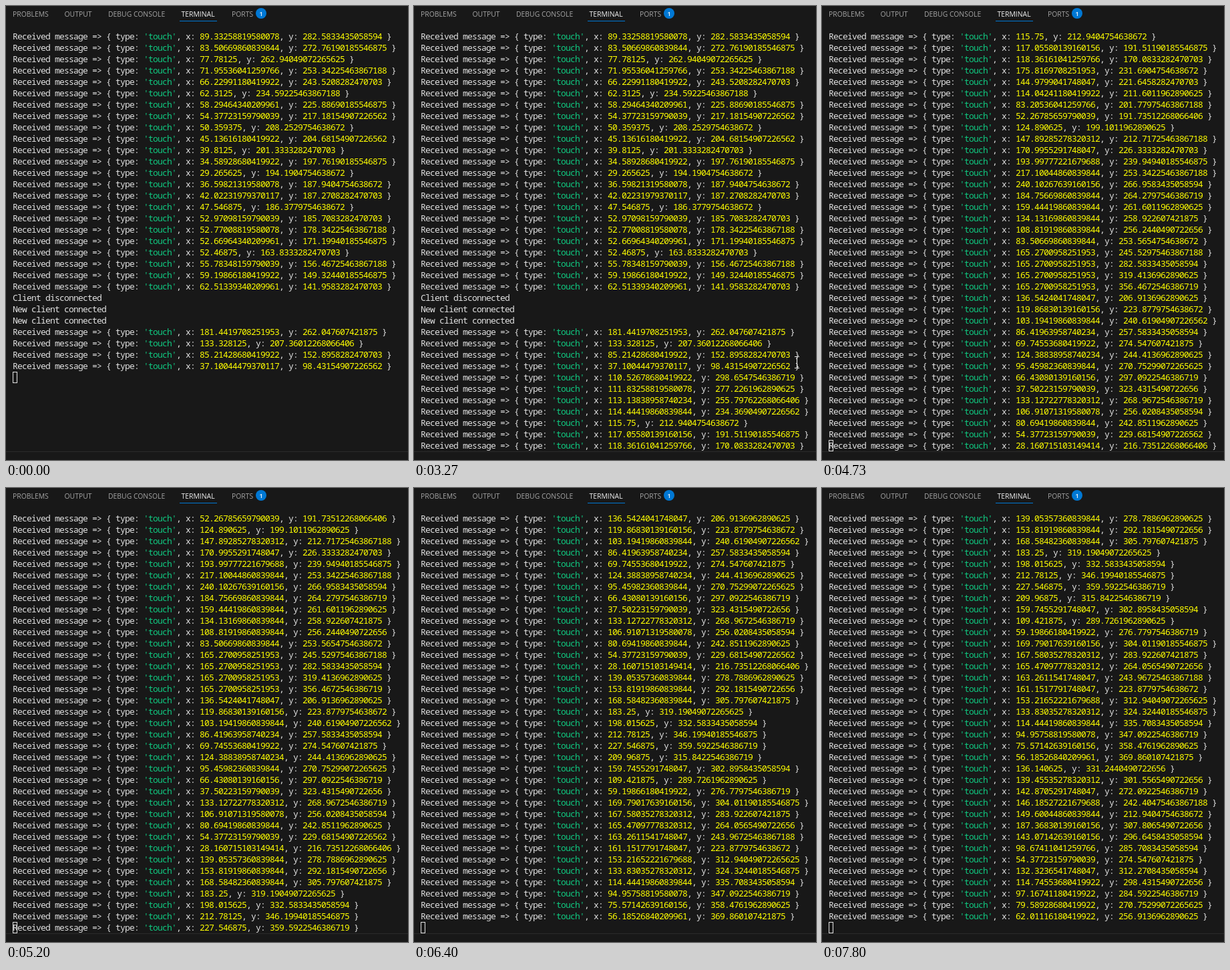
An HTML page with a canvas that plays this animation: 602x679 px, repeating every 8000 ms.

```html
<!DOCTYPE html>
<html lang="en">
<head>
<meta charset="utf-8">
<title>Terminal log</title>
<style>
html, body { margin: 0; width: 100%; height: 100%; overflow: hidden; background: #181818; }
canvas { display: block; }
</style>
</head>
<body>
<canvas id="stage" width="602" height="679"></canvas>
<script>
const ctx = document.getElementById('stage').getContext('2d', { alpha: false });
const LOOP = 8000, ROWS = 37, CELL_W = 7, CELL_H = 17, LEFT = 10, TOP = 37;
const BG = '#181818', FG = '#e2e2e2', GREEN = '#10c880', YELLOW = '#ffff00', BLUE = '#0078d4';

const log = [], steps = [];

const say = text => log.push([[text, FG]]);

// The touch screen reports positions on a fixed grid, as 32-bit floats.
const snap = (v, size, offset) =>
  String(Math.fround((Math.round((v * 448 - offset) / size) * size + offset) / 448));

function touch(x, y) {
  log.push([
    ['Received message => { type: ', FG], ["'touch'", GREEN],
    [', x: ', FG], [snap(x, 45, 16), YELLOW],
    [', y: ', FG], [snap(y, 100, 292 / 3), YELLOW], [' }', FG]
  ]);
}

// One finger stroke: n touches spread evenly along a polyline.
function swipe(n, ...points) {
  for (let i = 0; i < n; i++) {
    const u = i / (n - 1) * (points.length - 1);
    const k = Math.min(Math.floor(u), points.length - 2);
    const [a, b] = [points[k], points[k + 1]];
    const mix = axis => a[axis] + (b[axis] - a[axis]) * (u - k);
    touch(mix(0), mix(1));
  }
}

const step = (t, top, cursor, pointer = false) =>
  steps.push({ t, top, cursor, pointer, end: log.length });

// A live swipe first fills the cursor row, then scrolls once more.
function live(start, settle, n, from, to) {
  swipe(n, from, to);
  if (start < settle) step(start, log.length - ROWS, ROWS - 1);
  step(settle, log.length - ROWS + 1, ROWS - 1);
}

swipe(13, [89.33, 282.6], [66.23, 243.5], [50.36, 208.3], [29.27, 194.2]);
swipe(10, [36.6, 187.9], [52.97, 185.7], [52.47, 163.8], [62.51, 142]);
say('Client disconnected');
say('New client connected');
say('New client connected');
swipe(4, [181.44, 262], [37.1, 98.4]);
step(0, 0, 30);

swipe(7, [110.53, 298.7], [118.36, 170.1]);
step(1530, 0, 30);
step(1600, 0, -1);

swipe(5, [175.82, 231.7], [52.27, 191.7]);
swipe(6, [124.89, 199.1], [240.1, 267]);
swipe(5, [184.76, 264.3], [83.51, 253.6]);
swipe(4, [165.27, 245.5], [165.27, 356.5]);
swipe(5, [136.54, 206.9], [69.75, 274.5]);

// The wheel brings the view down to the newest line.
for (let i = 0; i < 7; i++) step(3270 + i * 66.7, i * 3, -1, true);
step(4070, 22, -1);
step(4130, 26, ROWS - 1);

live(4200, 4270, 4, [124.39, 244.4], [37.5, 323.4]);
live(4730, 4800, 5, [133.13, 269], [28.16, 216.7]);
live(5200, 5270, 7, [139.05, 278.8], [227.55, 359.6]);
live(5470, 5530, 4, [209.97, 315.8], [59.2, 276.8]);
live(5800, 5870, 5, [169.79, 304], [161.15, 223.9]);
live(6330, 6400, 6, [153.22, 312.9], [56.19, 369.9]);
live(6730, 6800, 5, [136.14, 331.2], [149.6, 212.9]);
live(7270, 7270, 4, [187.37, 307.8], [54.38, 274.5]);
live(7730, 7800, 5, [132.32, 312.3], [62.01, 256.9]);

function rect(x, y, w, h, color) {
  ctx.fillStyle = color;
  ctx.fillRect(x, y, w, h);
}

function drawTabs() {
  ctx.font = '10.4px "Open Sans", "Noto Sans", sans-serif';
  const tabs = [['PROBLEMS', 10], ['OUTPUT', 87.5], ['DEBUG CONSOLE', 153], ['TERMINAL', 262.5], ['PORTS', 338]];
  for (const [name, x] of tabs) {
    ctx.fillStyle = name === 'TERMINAL' ? '#f0f0f0' : '#a4a4a4';
    ctx.fillText(name, x, 16);
  }
  rect(260, 22, 56, 1, BLUE);
  ctx.fillStyle = BLUE;
  ctx.beginPath();
  ctx.arc(382, 11, 8, 0, Math.PI * 2);
  ctx.fill();
  ctx.font = '600 9px "Open Sans", "Noto Sans", sans-serif';
  ctx.textAlign = 'center';
  ctx.fillStyle = '#ffffff';
  ctx.fillText('1', 382, 14.5);
  ctx.textAlign = 'left';
}

function drawLine(line, row) {
  const y = TOP + row * CELL_H + 13;
  let col = 0;
  for (const [text, color] of line) {
    ctx.fillStyle = color;
    for (const ch of text) ctx.fillText(ch, LEFT + CELL_W * col++, y);
  }
}

function drawPointer(x, y) {
  rect(x, y + 1, 1, 16, '#ffffff');
  for (const dy of [0, 17]) {
    rect(x - 3, y + dy, 3, 1, '#ffffff');
    rect(x + 1, y + dy, 3, 1, '#ffffff');
  }
}

function draw(s) {
  rect(0, 0, 602, 679, BG);
  drawTabs();
  rect(0, 666, 602, 1, '#2b2b2b');
  ctx.font = '500 13px "Noto Sans Mono", "DejaVu Sans Mono", monospace';
  log.slice(s.top, Math.min(s.end, s.top + ROWS)).forEach(drawLine);
  if (s.cursor >= 0) {
    ctx.strokeStyle = FG;
    ctx.lineWidth = 1;
    ctx.strokeRect(LEFT + 0.5, TOP + s.cursor * CELL_H + 0.5, CELL_W - 1, CELL_H - 1);
  }
  if (s.pointer) drawPointer(573, 524);
}

const began = performance.now();
let shown = null;

function tick() {
  const t = (performance.now() - began) % LOOP;
  const now = steps.filter(s => s.t <= t).pop();
  if (now !== shown) draw(shown = now);
  requestAnimationFrame(tick);
}
tick();
</script>
</body>
</html>
```
